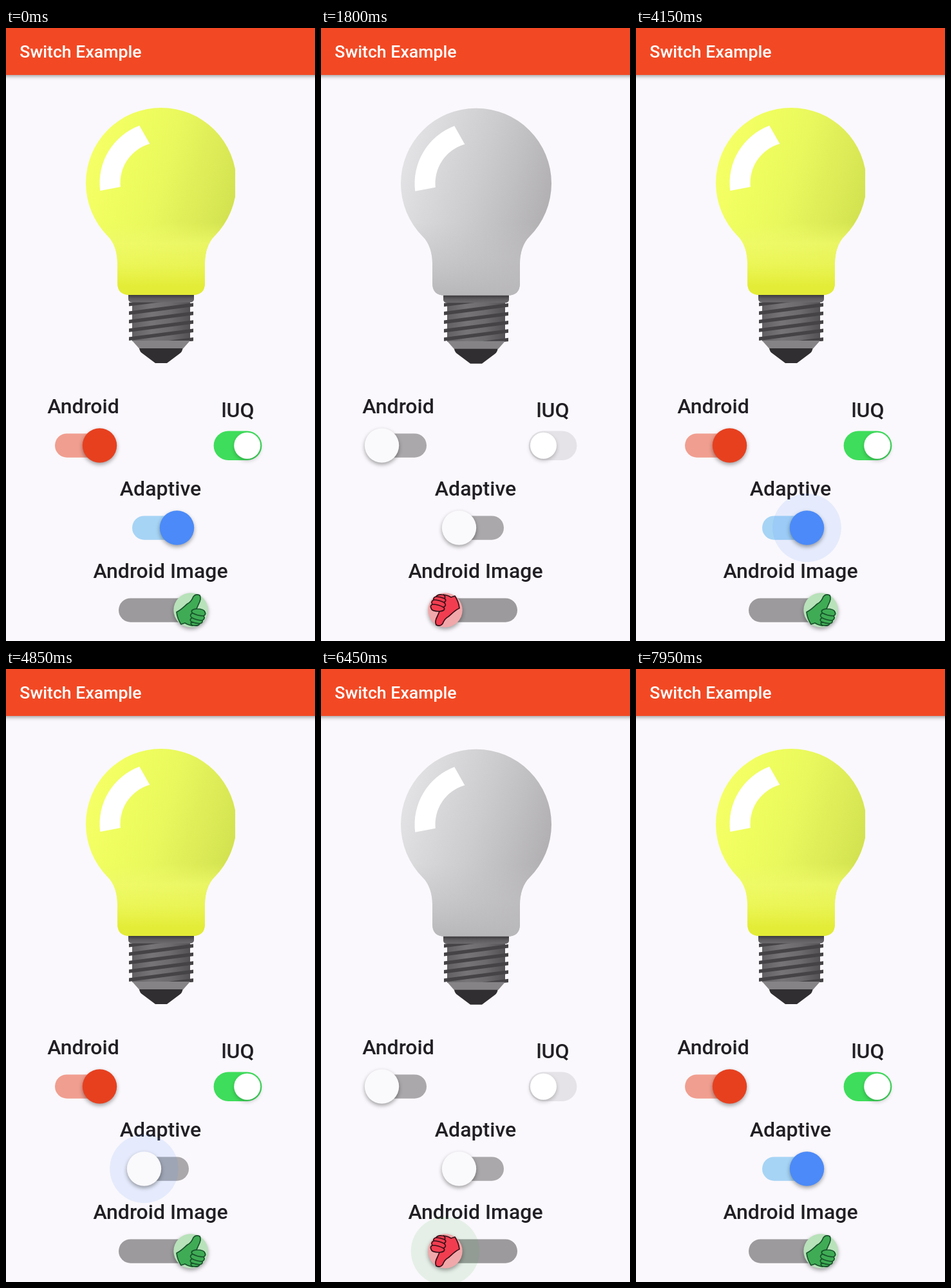
Write an HTML page with a canvas that moves like this. It is 480 by 953 pixels and loops after 8 s.

```html
<!DOCTYPE html>
<html lang="en">
<head>
<meta charset="utf-8">
<title>Switch Example</title>
<style>
  html, body { margin: 0; width: 100%; height: 100%; overflow: hidden; background: #faf8fc; }
  canvas { display: block; }
</style>
</head>
<body>
<canvas id="stage" width="480" height="953"></canvas>
<script>
const ctx = document.getElementById('stage').getContext('2d');
const LOOP = 8000, STEP = 50;
const BG = '#faf8fc', TAU = Math.PI * 2;

const clamp = v => Math.min(1, Math.max(0, v));
const mix = (a, b, p) => a + (b - a) * p;
const smooth = v => v * v * (3 - 2 * v);
const easeOut = v => 1 - (1 - v) ** 2;
const mixColor = (a, b, p) =>
  `rgb(${a.map((v, i) => Math.round(mix(v, b[i], p))).join(',')})`;

// Every gesture flips the state shared by all four switches on release.
const gestures = [
  { id: 'android',  press: 50,   drag: [300, 700],   release: 1450, curve: smooth },
  { id: 'cupertino', press: 2150, drag: [2250, 2550], release: 2840, curve: smooth },
  { id: 'adaptive', press: 3950, drag: [4250, 4700], release: 5050, curve: smooth },
  { id: 'image',    press: 6250, drag: [6600, 7250], release: 7400, curve: v => v ** 3 }
];

const GREY = [170, 168, 171], WHITE = [250, 249, 251];
const switches = [
  { id: 'android', x: 120, y: 649, w: 88, travel: 25.5, ripple: 'rgba(232,64,31,.12)',
    track: [GREY, [240, 158, 143]], thumb: [WHITE, [231, 64, 31]] },
  { id: 'adaptive', x: 240, y: 777, w: 88, travel: 25.5, ripple: 'rgba(74,138,248,.12)',
    track: [GREY, [166, 212, 245]], thumb: [WHITE, [75, 138, 248]] },
  { id: 'image', x: 240, y: 905, w: 130, travel: 47, ripple: 'rgba(76,175,80,.12)',
    track: [[156, 154, 157], [156, 154, 157]], thumb: [[241, 168, 170], [184, 226, 186]] }
];

const passed = t => gestures.filter(g => t >= g.release).length;

function position(id, t) {
  const count = passed(t), target = count % 2 ? 0 : 1;
  const last = gestures[count - 1], next = gestures[count];
  let p = target;
  if (last && last.id !== id) {
    const s = clamp((t - last.release) / 200);
    p = mix(1 - target, target, id === 'cupertino' ? s : s ** 1.7);
  }
  if (next && next.id === id) {
    const [from, to] = next.drag;
    p = mix(p, 1 - target, next.curve(clamp((t - from) / (to - from))));
  }
  return p;
}

function pressure(id, t, duration) {
  const g = gestures.find(item => item.id === id);
  const grow = clamp((t - g.press) / duration);
  const shrink = clamp((t - g.release) / duration);
  return easeOut(Math.max(0, grow - shrink));
}

function fill(color, draw) {
  ctx.beginPath();
  draw();
  ctx.fillStyle = color;
  ctx.fill();
}

function poly(color, ...points) {
  fill(color, () => points.forEach(p => ctx.lineTo(...p)));
}

function gradient(x0, y0, x1, y1, ...colors) {
  const g = ctx.createLinearGradient(x0, y0, x1, y1);
  colors.forEach((c, i) => g.addColorStop(i / (colors.length - 1), c));
  return g;
}

function withShadow(alpha, blur, dy, draw) {
  ctx.save();
  ctx.shadowColor = `rgba(0,0,0,${alpha})`;
  ctx.shadowBlur = blur;
  ctx.shadowOffsetY = dy;
  draw();
  ctx.restore();
}

const disc = (color, x, y, r) => fill(color, () => ctx.arc(x, y, r, 0, TAU));
const pill = (color, x, y, w, h) => fill(color, () => ctx.roundRect(x, y, w, h, h / 2));

function text(str, x, y, size, color, align) {
  ctx.font = `500 ${size}px Roboto, sans-serif`;
  ctx.fillStyle = color;
  ctx.textAlign = align;
  ctx.fillText(str, x, y);
}

const label = (str, x, y) => text(str, x, y, 32, '#211f23', 'center');

const glass = new Path2D(`M158.3 323.7 A117 117 0 1 1 323.7 323.7
  C314 333 309 349 309 365 V396 Q309 415 290 415 H192 Q173 415 173 396 V365
  C173 349 168 333 158.3 323.7Z`);

function drawBulb(lit) {
  ctx.save();
  if (!lit) ctx.translate(0, .7);

  ctx.save();
  if (lit) {
    ctx.beginPath();
    ctx.rect(0, 0, 356, 953);
    ctx.clip();
  }
  ctx.fillStyle = lit
    ? gradient(130, 208, 352, 276, '#f5ff66', '#effd5e', '#e9f85d', '#deed58', '#d3e250')
    : gradient(130, 208, 352, 276, '#e2e1e4', '#d7d6d8', '#cccbcd', '#bfbec0', '#b2b0b2');
  ctx.fill(glass);
  ctx.fillStyle = lit
    ? gradient(0, 302, 0, 402, 'rgba(239,250,104,0)', 'rgba(239,250,104,.8)',
        'rgba(235,245,85,.9)', '#e3ec36')
    : gradient(0, 302, 0, 412, 'rgba(198,197,199,0)', 'rgba(194,193,195,.55)', '#b8b7b9');
  ctx.fill(glass);
  ctx.restore();

  fill('#fff', () => {
    ctx.arc(241, 241, 95.5, 3.015, 4.351);
    ctx.arc(241, 241, 63.5, 4.43, 3.045, true);
  });
  drawBase();
  ctx.restore();
}

function drawBase() {
  const metal = gradient(196, 0, 286, 0, '#626063', '#767477', '#6c6a6d', '#535154');
  poly(metal, [196, 425], [286, 425], [286, 487], [196, 487]);

  ctx.save();
  ctx.beginPath();
  ctx.rect(191, 426, 100, 61);
  ctx.clip();
  for (let y = 430; y < 500; y += 13.4)
    poly('#454346', [191, y - 3], [291, y - 16], [291, y - 10.5], [191, y + 2.5]);
  ctx.restore();

  fill(gradient(0, 415, 0, 426, '#3c3a3d', '#5d5b5e', '#6b696c'),
    () => ctx.roundRect(190, 415, 102, 11.5, [0, 0, 5, 5]));
  poly('#858386', [196, 486], [286, 486], [275, 498.5], [207, 498.5]);
  fill('#302e31', () => {
    ctx.moveTo(207, 498);
    ctx.lineTo(274.5, 498);
    ctx.quadraticCurveTo(274, 503, 270, 506);
    ctx.lineTo(250, 521);
    ctx.lineTo(232, 521);
    ctx.lineTo(212, 506);
    ctx.quadraticCurveTo(207.5, 503, 207, 498);
  });
}

const hand = new Path2D(`M-22 3 C-15 0 -10 -6 -5 -10 Q1 -13 4 -21 Q8 -26 14 -23
  Q17 -18 12 -9 L9 -2 Q21 -2 22 3 Q24 7 20 9 Q23 13 18 16 Q19 20 14 21
  Q12 25 5 24 Q-3 24 -9 20 L-15 22 Q-21 13 -22 3Z`);
const fingers = new Path2D(`M9 -2 Q-1 -1 2 4 Q10 9 20 9 M2 5 Q-3 8 2 12
  Q10 16 18 16 M2 12 Q-3 15 1 18 Q8 21 14 21 M1 18 Q-1 22 3 24`);

function drawHand(x, y, up) {
  ctx.save();
  ctx.translate(x, y);
  if (!up) ctx.rotate(Math.PI);
  ctx.fillStyle = up ? '#3fac55' : '#f23d50';
  ctx.strokeStyle = up ? '#17512a' : '#351018';
  ctx.lineWidth = 1.7;
  ctx.lineJoin = ctx.lineCap = 'round';
  ctx.fill(hand);
  ctx.stroke(hand);
  ctx.stroke(fingers);
  ctx.restore();
}

function drawSwitch({ id, x, y, w, travel, ripple, track, thumb }, t) {
  const p = position(id, t);
  const cx = x + mix(-travel, travel, p);
  pill(mixColor(...track, p), x - w / 2, y - 18.6, w, 37.3);
  const r = 53.3 * pressure(id, t, 100);
  if (r > 0) disc(ripple, cx, y, r);
  withShadow(.36, 6, 3, () => disc(mixColor(...thumb, p), cx, y, 26.7));
  if (id === 'image') drawHand(cx, y, p >= .5);
}

function drawCupertino(t) {
  const p = position('cupertino', t);
  const extra = 10.3 * pressure('cupertino', t, 300);
  pill(mixColor([229, 227, 231], [63, 221, 92], p), 322.6, 626.5, 74.8, 45.4);
  withShadow(.22, 6, 3, () =>
    pill('#fff', mix(325, 354.2 - extra, p), 628.7, 41 + extra, 41));
}

function drawFrame(t) {
  ctx.fillStyle = BG;
  ctx.fillRect(0, 0, 480, 953);
  withShadow(.38, 6, 2, () => {
    ctx.fillStyle = '#f24924';
    ctx.fillRect(-10, -10, 500, 83);
  });
  text('Switch Example', 21.3, 46, 26.67, '#fff', 'left');

  drawBulb(passed(t) % 2 === 0);

  const [android, adaptive, image] = switches;
  label('Android', 120, 599);
  drawSwitch(android, t);
  label('lUQ', 360, 605);
  drawCupertino(t);
  label('Adaptive', 240, 727);
  drawSwitch(adaptive, t);
  label('Android Image', 240, 855);
  drawSwitch(image, t);
}

const start = performance.now();
function tick() {
  const t = (performance.now() - start) % LOOP;
  drawFrame(Math.floor(t / STEP) * STEP);
  requestAnimationFrame(tick);
}
tick();
</script>
</body>
</html>
```
